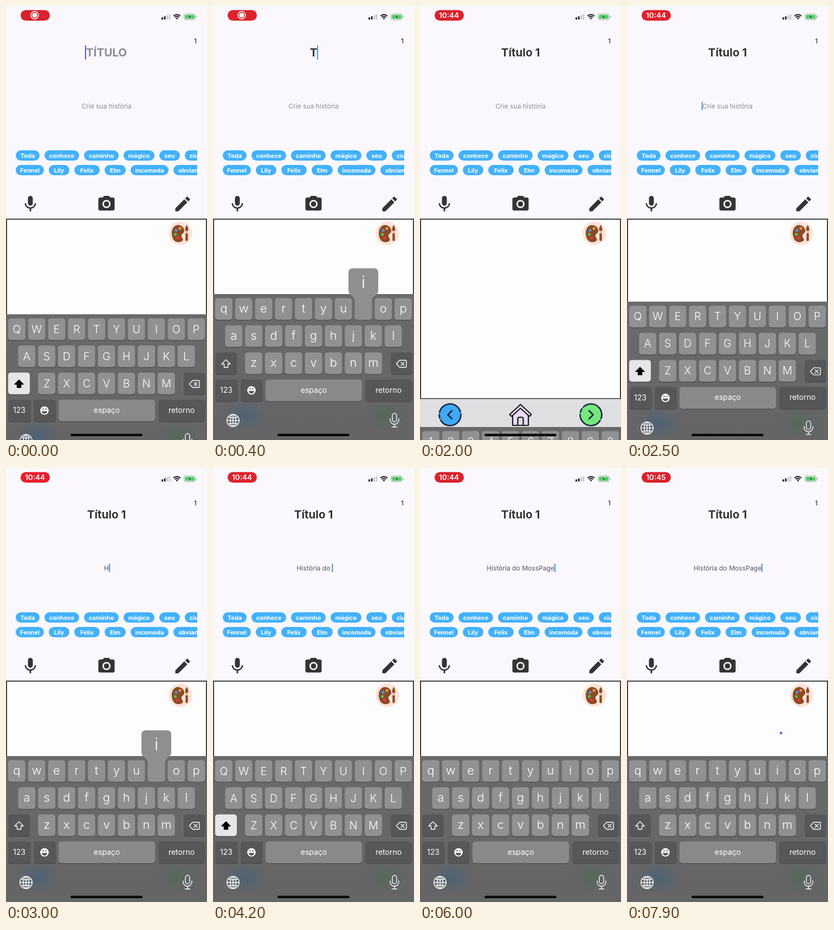
Write an HTML page that moves like this. It is 371 px wide and 800 px high and loops after 8 s.

```html
<!DOCTYPE html>
<html lang="pt">
<head>
<meta charset="utf-8">
<style>
html, body { margin: 0; width: 100%; height: 100%; overflow: hidden; background: #fbf8fd; }
svg { display: block; width: 100vw; height: 100vh; }
text { font-family: Inter, Roboto, sans-serif; text-anchor: middle; white-space: pre; }
.ink { fill: #343437; }
.chip { font-size: 11px; font-weight: 700; fill: #fff; }
#board text { fill: #fff; }
.label { font-size: 14px; }
.line { fill: none; stroke: #fff; stroke-width: 1.4; stroke-linejoin: round; stroke-linecap: round; }
.navy { stroke: #14213d; stroke-width: 2.6; stroke-linecap: round; stroke-linejoin: round; }
</style>
</head>
<body>
<svg id="stage" viewBox="0 0 371 800">
  <defs>
    <linearGradient id="shade" x2="0" y2="1"><stop stop-color="#6a6a6b"/><stop offset="1" stop-color="#5f5f61"/></linearGradient>
    <radialGradient id="blueGlow"><stop stop-color="#356084" stop-opacity=".5"/><stop offset="1" stop-color="#356084" stop-opacity="0"/></radialGradient>
    <radialGradient id="greenGlow"><stop stop-color="#456a4c" stop-opacity=".45"/><stop offset="1" stop-color="#456a4c" stop-opacity="0"/></radialGradient>
    <clipPath id="chipArea"><path d="M0 260H353V320H0z"/></clipPath>
  </defs>
  <rect width="371" height="800" fill="#fbf8fd"/>

  <!-- status bar -->
  <rect id="pill" x="27" y="7.5" width="54" height="19.5" rx="9.75"/>
  <text id="clock" x="53.5" y="22" font-size="13.5" font-weight="600" fill="#fff"></text>
  <g id="record"><circle cx="53" cy="17" r="7" fill="none" stroke="#fff" stroke-width="1.5"/><circle cx="53" cy="17" r="4.6" fill="#fff"/></g>
  <path d="M287 21h3v4h-3zM291.6 19h3v6h-3z" fill="#29292b"/>
  <path d="M296.2 17h3v8h-3zM300.6 15h2.6v10h-2.6z" fill="#c9c7cb"/>
  <path d="M309.2 18.4a9 9 0 0 1 12.6 0M311.6 21a5.6 5.6 0 0 1 7.8 0" fill="none" stroke="#222" stroke-width="2.1"/>
  <path d="M313.3 22.7a3.2 3.2 0 0 1 4.4 0L315.5 25z" fill="#222"/>
  <rect x="328.6" y="14.6" width="20.8" height="10.8" rx="3" fill="none" stroke="#a5a4a8"/>
  <rect x="330.2" y="16.2" width="17.6" height="7.6" rx="1.6" fill="#43d65b"/>
  <path d="M350.6 18v4q1.6-.7 1.6-2t-1.6-2" fill="#a5a4a8"/>
  <path d="M340.5 15l-5 5.6h3.3l-1.2 4.4 5-5.7h-3.3z" fill="#222" stroke="#fff" stroke-width=".5"/>

  <text x="349.5" y="69" font-size="12" font-weight="500" class="ink">1</text>
  <text id="title" x="185.5" y="93" font-size="20.6" font-weight="700"></text>
  <text id="story" x="185.5" y="188.5" font-size="12.1"></text>
  <rect id="caret" width="2"/>
  <g id="chips" clip-path="url(#chipArea)"></g>

  <g class="ink">
    <path transform="translate(27 347) scale(1.5)" d="M12 14c1.66 0 3-1.34 3-3V5c0-1.66-1.34-3-3-3S9 3.34 9 5v6c0 1.66 1.34 3 3 3zm5.3-3c0 3-2.54 5.1-5.3 5.1S6.7 14 6.7 11H5c0 3.41 2.72 6.23 6 6.72V21h2v-3.28c3.28-.48 6-3.3 6-6.72z"/>
    <g transform="translate(167.5 347) scale(1.5)"><circle cx="12" cy="12" r="3.2"/><path d="M9 2L7.17 4H4c-1.1 0-2 .9-2 2v12c0 1.1.9 2 2 2h16c1.1 0 2-.9 2-2V6c0-1.1-.9-2-2-2h-3.17L15 2zm3 15c-2.76 0-5-2.24-5-5s2.24-5 5-5 5 2.24 5 5-2.24 5-5 5z"/></g>
    <path transform="translate(308 347) scale(1.5)" d="M3 17.25V21h3.75L17.81 9.94l-3.75-3.75zM20.71 7.04c.39-.39.39-1.02 0-1.41l-2.34-2.34c-.39-.39-1.02-.39-1.41 0l-1.83 1.83 3.75 3.75z"/>
  </g>

  <!-- drawing area -->
  <rect x="1" y="392.8" width="369" height="331" fill="#fefdfe" stroke="#222" stroke-width="1.7"/>
  <circle cx="322" cy="419" r="21.7" fill="#fee3d6"/>
  <path d="M320 404C311 402 305 411 306 421C307 431 313 437 321 435C327 434 328 430 325 427C322 423 325 420 328 418C331 414 328 406 320 404z" fill="#8b4a26"/>
  <circle cx="321" cy="410" r="2.6" fill="#e39a45"/><circle cx="314" cy="413.5" r="2.6" fill="#3d9bea"/>
  <circle cx="312.6" cy="421" r="2.6" fill="#3fce58"/><circle cx="317" cy="427.5" r="2.6" fill="#e43b3b"/>
  <path d="M333.5 403.5q4 6 2.6 11h-5.2q-1.4-5 2.6-11z" fill="#8b4a26"/>
  <path d="M331 415.5h5v2.6h-5z" fill="#e2b28f"/><path d="M331.3 419h4.4v12.5q-2.2 4-4.4 0z" fill="#8b4a26"/>
  <circle id="dot" cx="284.2" cy="488.6" r="2.3" fill="#8c3edb"/>

  <!-- bottom bar -->
  <path d="M0 724.5H371V800H0z" fill="#dfdee0"/>
  <g class="navy">
    <circle cx="55.5" cy="753.5" r="20" fill="#3eaaf6" stroke-dasharray="52 4 7 4"/>
    <path d="M59 746l-7.5 7.5 7.5 7.5" fill="none"/>
    <circle cx="315.5" cy="753.5" r="20" fill="#76e77c" stroke-dasharray="7 4 52 4"/>
    <path d="M312 746l7.5 7.5-7.5 7.5" fill="none"/>
    <g stroke="#17151a" stroke-width="2.2">
      <path d="M171 752v21h29v-21l-14.500-14z" fill="#eadcfa"/>
      <path d="M165.500 753l20-18.500 20 18.500-3.500 3.500-16.500-15-16.500 15z" fill="#eadcfa"/>
      <path d="M180.500 773v-12q0-3 3-3h4q3 0 3 3v12z" fill="#dfdee0"/>
    </g>
  </g>

  <g id="board">
    <path d="M0 531H371V1080H0z" fill="url(#shade)"/>
    <ellipse cx="58" cy="755" rx="40" ry="30" fill="url(#blueGlow)"/>
    <ellipse cx="318" cy="755" rx="40" ry="30" fill="url(#greenGlow)"/>
    <g id="fixedKeys"></g>
    <path class="line" d="M338.500 659.500l6-6.500h11q1.500 0 1.500 1.500v10q0 1.500-1.500 1.500h-11zM347 656.500l6 6M353 656.500l-6 6"/>
    <circle cx="71" cy="708.500" r="7.800" fill="#fff"/>
    <path d="M66 709.500h10a5 5 0 0 1-10 0zM67.500 704.500h2v2.500h-2zM72.500 704.500h2v2.500h-2z" fill="#58585a"/>
    <g class="line">
      <circle cx="37" cy="764" r="11.300"/><ellipse cx="37" cy="764" rx="5.300" ry="11.300"/>
      <path d="M37 753v22M26 764h22M28.500 757.500q8.500 3.500 17 0M28.500 770.500q8.500-3.500 17 0"/>
      <rect x="331" y="751" width="8" height="15.500" rx="4"/>
      <path d="M327 761v2a8 8 0 0 0 16 0v-2M335 771v5M330.500 776h9"/>
    </g>
    <g id="layouts"></g>
    <g id="popup"><path fill="#8f8f91"/><text font-size="31" font-weight="300"></text></g>
  </g>
  <rect x="119" y="788.500" width="133" height="4.600" rx="2.300" fill="#0b0b0c"/>
</svg>
<script>
const $ = id => document.getElementById(id);
const LOOP = 8000, MID = 185.5, BOARD_H = 269;
const KEY = '#919193', DARK = '#575759';

const box = (x, y, w, h, fill, rx = 5) =>
  `<rect x="${x}" y="${y}" width="${w}" height="${h}" rx="${rx}" fill="${fill}"/>`;
const key = (x, y, w, fill = KEY) => box(x, y + 1.3, w, 40, '#48484a') + box(x, y, w, 40, fill);
const label = (x, y, s, attrs = 'class="label"') => `<text x="${x}" y="${y}" ${attrs}>${s}</text>`;

// word chips: [word, x, width]
const chipRows = [
  [['Toda', 18, 44], ['conhece', 71, 64], ['caminho', 144, 64], ['mágico', 217, 57], ['seu', 283, 38], ['ciumenta', 330, 68]],
  [['Fennel', 18, 52], ['Lily', 79, 38], ['Felix', 126, 47], ['Elm', 182, 39], ['incomoda', 230, 70], ['obviamente', 309, 82]]
];
$('chips').innerHTML = chipRows.map((row, r) => row.map(([word, x, w]) =>
  box(x, 266 + 27 * r, w, 19, '#43b1fa', 9.5) + label(x + w / 2, 279.5 + 27 * r, word, 'class="chip"')
).join('')).join('');

// keyboard
$('fixedKeys').innerHTML = key(328, 638.5, 40, DARK) + key(4, 688.5, 42, DARK) + key(51, 688.5, 41, DARK) +
  key(97, 688.5, 178, '#89898b') + key(281, 688.5, 86.5, DARK) +
  label(186, 712.5, 'espaço') + label(324, 712.5, 'retorno');

const rows = {
  upper: ['QWERTYUIOP', 'ASDFGHJKL', 'ZXCVBNM'],
  lower: ['qwertyuiop', 'asdfghjkl', 'zxcvbnm'],
  nums: ['1234567890', '-/:;()$&@"', '.,?!\'']
};
const spots = {};
for (const name in rows) {
  const nums = name === 'nums', up = name === 'upper';
  let html = key(4, 638.5, 40, up ? '#e6e6e7' : DARK) + label(24.5, 713, nums ? 'ABC' : '123');
  html += nums ? label(24, 663, '#+=') :
    `<path class="line" d="M24 652l8 8h-4.500v6h-7v-6h-4.500z"${up ? ' style="fill:#000;stroke:#000"' : ''}/>`;
  rows[name].forEach((chars, r) => {
    const wide = nums && r === 2, pitch = wide ? 51 : 36.8, w = wide ? 46 : 32;
    const left = MID - (pitch * (chars.length - 1) + w) / 2;
    [...chars].forEach((c, i) => {
      const x = left + i * pitch, y = 538.5 + 50 * r;
      spots[c] = { x, y };
      html += key(x, y, w) + label(x + w / 2, y + (name === 'lower' ? 26 : 27), c.replace('&', '&amp;'),
        `font-size="${name === 'lower' ? 22 : 20}" font-weight="350"`);
    });
  });
  $('layouts').innerHTML += `<g id="${name}">${html}</g>`;
}

// [release time, character]
const strokes = (text, times) => [...text].map((c, i) => [times[i], c]);
const titleKeys = strokes('Titulo 1', [300, 420, 540, 680, 800, 930, 1180, 1600]);
const storyKeys = strokes('Historia do MossPage',
  [2880, 3080, 3200, 3330, 3460, 3570, 3680, 3780, 3880, 3980, 4080, 4170, 4480, 4650, 4800, 4950, 5250, 5420, 5560, 5720]);
const allKeys = [...titleKeys, ...storyKeys];
const modes = [[0, 'upper'], [300, 'lower'], [1350, 'nums'], [2150, 'upper'], [2880, 'lower'],
  [4180, 'upper'], [4480, 'lower'], [5080, 'upper'], [5250, 'lower']];

const typed = (keys, t) => keys.filter(k => k[0] <= t).map(k => k[1]).join('')
  .replace('Titulo ', 'Título ').replace('Historia ', 'História ');
const easeOut = u => 1 - (1 - Math.min(1, Math.max(0, u))) ** 3;
const show = (id, on) => $(id).style.display = on ? '' : 'none';

function setText(id, value, hint, ink) {
  const el = $(id);
  el.textContent = value.trim() || hint;
  el.style.fill = value ? ink : '#8d8c90';
  const half = el.getComputedTextLength() / 2;
  return value ? MID + half + (value.endsWith(' ') ? 3 : 0) : MID - half - 1.5;
}

function showPopup(t) {
  const press = allKeys.find(([at, c]) => c !== ' ' && t >= at - 120 && t < at);
  show('popup', press);
  if (!press) return;
  const { x, y } = spots[press[1]];
  const l = Math.min(Math.max(x - 11.5, 3), 313), r = l + 55, top = y - 55, R = x + 32;
  const [shape, letter] = $('popup').children;
  shape.setAttribute('d', `M${l + 8} ${top}H${r - 8}q8 0 8 8V${y - 15}C${r} ${y - 4} ${R} ${y - 6} ${R} ${y + 6}` +
    `V${y + 35}q0 5-5 5H${x + 5}q-5 0-5-5V${y + 6}C${x} ${y - 6} ${l} ${y - 4} ${l} ${y - 15}V${top + 8}q0-8 8-8z`);
  letter.setAttribute('x', l + 27.5);
  letter.setAttribute('y', y - 19);
  letter.textContent = press[1];
}

function draw(t) {
  const title = typed(titleKeys, t), story = typed(storyKeys, t);
  const titleEnd = setText('title', title, 'TÍTULO', '#343437');
  const storyEnd = setText('story', story, 'Crie sua história', '#58575b');

  const onTitle = t < 1780, focus = onTitle || t >= 2250;
  const last = allKeys.reduce((a, [at]) => at <= t ? at : a, 0);
  const since = t - (last < 2250 && !onTitle ? 2250 : last);
  const caret = $('caret');
  show('caret', focus && since % 1000 < 600);
  caret.setAttribute('x', onTitle ? titleEnd - .5 : storyEnd);
  caret.setAttribute('y', onTitle ? 72.5 : 176.5);
  caret.setAttribute('height', onTitle ? 26 : 15.5);
  caret.setAttribute('fill', title ? '#3f98e6' : '#5b45f2');

  const raised = t < 1780 ? easeOut((t + 192) / 400)
    : t < 2250 ? 1 - easeOut((t - 1780) / 400) : easeOut((t - 2250) / 400);
  $('board').setAttribute('transform', `translate(0 ${BOARD_H * (1 - raised)})`);
  const mode = modes.filter(m => m[0] <= t).pop()[1];
  for (const name in rows) show(name, name === mode);
  showPopup(t);

  const pulse = .5 - .5 * Math.cos(t * Math.PI / 1000);
  $('pill').setAttribute('fill', `rgb(${217 + 17 * pulse},${34 - 4 * pulse},${44 + 2 * pulse})`);
  show('record', t < 450);
  $('clock').textContent = t < 450 ? '' : t < 7000 ? '10:44' : '10:45';
  show('dot', t >= 7800);
}

const start = performance.now();
function tick() {
  draw((performance.now() - start) % LOOP);
  requestAnimationFrame(tick);
}
tick();
</script>
</body>
</html>
```
